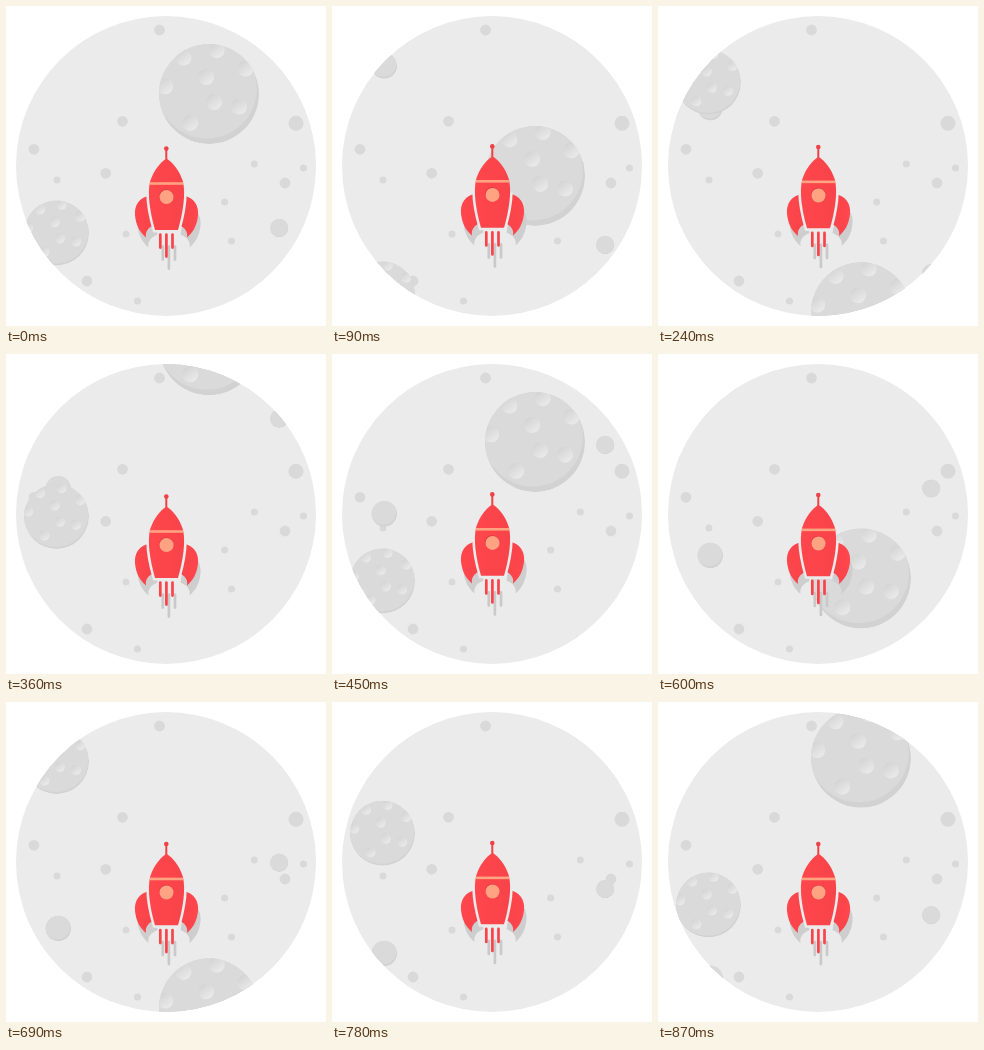
Write an HTML page that moves like this. It is 320 px wide and 320 px high and loops after 900 ms.

```html
<!DOCTYPE html>
<html lang="en">
<head>
<meta charset="utf-8">
<title>Rocket</title>
<style>
html, body { margin: 0; width: 100%; height: 100%; overflow: hidden; background: #fff; }
svg { display: block; width: 100vw; height: 100vh; }
</style>
</head>
<body>
<svg viewBox="0 0 320 320" xmlns="http://www.w3.org/2000/svg">
  <defs>
    <clipPath id="sky"><circle cx="160" cy="160" r="150"/></clipPath>
    <clipPath id="gap"><rect x="130" y="188" width="61" height="40"/></clipPath>
    <linearGradient id="pit" x1=".2" y1=".1" x2=".8" y2=".95">
      <stop offset="0" stop-color="#d4d4d4"/>
      <stop offset="1" stop-color="#ebebeb"/>
    </linearGradient>
    <linearGradient id="red">
      <stop offset="0" stop-color="#ff474c"/>
      <stop offset="1" stop-color="#f8434a"/>
    </linearGradient>
    <path id="fin" d="M144 189C133 191 128 199 129 209C130 219 134 226 140 231C139 225 142 221 149 218Z"/>
    <g id="fins">
      <use href="#fin"/>
      <use href="#fin" transform="translate(321 0) scale(-1 1)"/>
    </g>
    <path id="jets" d="M154.3 228V241M160.4 228V250M166.5 228V241" fill="none" stroke-width="2.7" stroke-linecap="round"/>
    <path id="hull" d="M160.5 151.8C167 156 173.5 164 176.8 174.5C180 187 177 206 172 223.3H149C144 206 141 187 144.2 174.5C147.5 164 154 156 160.5 151.8Z"/>
    <clipPath id="inHull"><use href="#hull"/></clipPath>
  </defs>
  <g clip-path="url(#sky)">
    <rect width="320" height="320" fill="#ebebeb"/>
    <g fill="none" stroke="#d9d9d9" stroke-linecap="round">
      <path stroke-width="7" d="M51 174h0M120 228h0M131.5 295h0M225.5 235h0M218.7 196h0M248.3 158h0M297.5 162h0"/>
      <path stroke-width="10.8" d="M153.5 24h0M116.5 115.3h0M28 143.3h0M99.7 167.3h0M81 275h0M279 177h0"/>
      <path stroke-width="15" d="M290 117.3h0"/>
    </g>
    <g id="moons"></g>
    <g id="rocket">
      <g transform="translate(2.5 10)" fill="#cecece" stroke="#c9c9c9">
        <use href="#fins" stroke="none"/>
        <use href="#jets" y="2"/>
      </g>
      <use href="#fins" fill="url(#red)"/>
      <use href="#hull" clip-path="url(#gap)" fill="#ebebeb" stroke="#ebebeb" stroke-width="5"/>
      <use href="#jets" stroke="#f8434a"/>
      <path d="M160.3 143V154" stroke="#ee4148" stroke-width="2"/>
      <circle cx="160.3" cy="142" r="2.3" fill="#ee4148"/>
      <use href="#hull" fill="url(#red)"/>
      <rect x="140" y="175.6" width="41" height="2.6" fill="#ffa383" clip-path="url(#inHull)"/>
      <circle cx="160" cy="189.8" r="7.1" fill="#e03c43"/>
      <circle cx="160.5" cy="190.5" r="7" fill="#ffa383"/>
    </g>
  </g>
</svg>
<script>
const STEP = 30, COUNT = 30, MID = 160, SKY = 150;
const $ = id => document.getElementById(id);
const lerp = (a, b, t) => a + (b - a) * t;

function add(parent, tag, attrs) {
  const el = document.createElementNS('http://www.w3.org/2000/svg', tag);
  for (const k in attrs) el.setAttribute(k, attrs[k]);
  return parent.appendChild(el);
}
const disc = (parent, cx, cy, r, fill = '#000') => add(parent, 'circle', { cx, cy, r, fill });

// Craters as [degrees, distance / radius]: an arc along the rim and four inside
const craters = [[23, .65], [123, .69], [58, .19], [260, .345]];
for (let a = 190; a < 360; a += 45) craters.push([a, .89]);

// rest: height at the start of a lap, out: steps until the moon has left the sky
const moons = [
  { x: 52.3, r: 12.8, lift: 2, rest: 35, laps: 1, out: () => COUNT },
  { x: 273.2, r: 9.2, lift: 0.6, rest: 222, laps: 1, out: () => 9 },
  { x: 50.5, r: 32.5, lift: 1.8, rest: 227, laps: 2, out: lap => 4 + lap, craters },
  { x: 203, r: 50, lift: 5.5, rest: 88, laps: 2, out: () => 10, craters }
];

moons.forEach((m, i) => {
  const clip = add(document.querySelector('defs'), 'clipPath', { id: 'moon' + i });
  disc(clip, 0, 0, m.r);
  m.el = add($('moons'), 'g', {});
  const g = add(m.el, 'g', { 'clip-path': `url(#moon${i})` });
  disc(g, 0, 0, m.r, '#d2d2d2');
  disc(g, -m.lift * 0.4, -m.lift, m.r, '#dadada');
  for (const [deg, dist] of m.craters || []) {
    const a = deg * Math.PI / 180, d = dist * m.r;
    disc(g, d * Math.cos(a), d * Math.sin(a), m.r * 0.16, 'url(#pit)');
  }
});

// Falls out of the round sky, then comes back in from above
function height(m, n) {
  const span = COUNT / m.laps, lap = Math.floor(n / span), p = n % span;
  const out = m.out(lap);
  const reach = Math.sqrt((SKY + m.r + m.lift) ** 2 - (m.x - MID) ** 2);
  return p <= out
    ? lerp(m.rest, MID + reach, p / out)
    : lerp(MID - reach, m.rest, (p - out - 1) / (span - out - 1));
}

function draw(now) {
  const n = Math.floor(now / STEP) % COUNT;
  for (const m of moons) m.el.setAttribute('transform', `translate(${m.x} ${height(m, n)})`);
  const shake = 1.1 * Math.cos(n * Math.PI / 3) - 0.5;
  $('rocket').setAttribute('transform', `translate(0 ${shake})`);
}

const start = performance.now();
function tick() {
  draw(performance.now() - start);
  requestAnimationFrame(tick);
}
tick();
</script>
</body>
</html>
```
